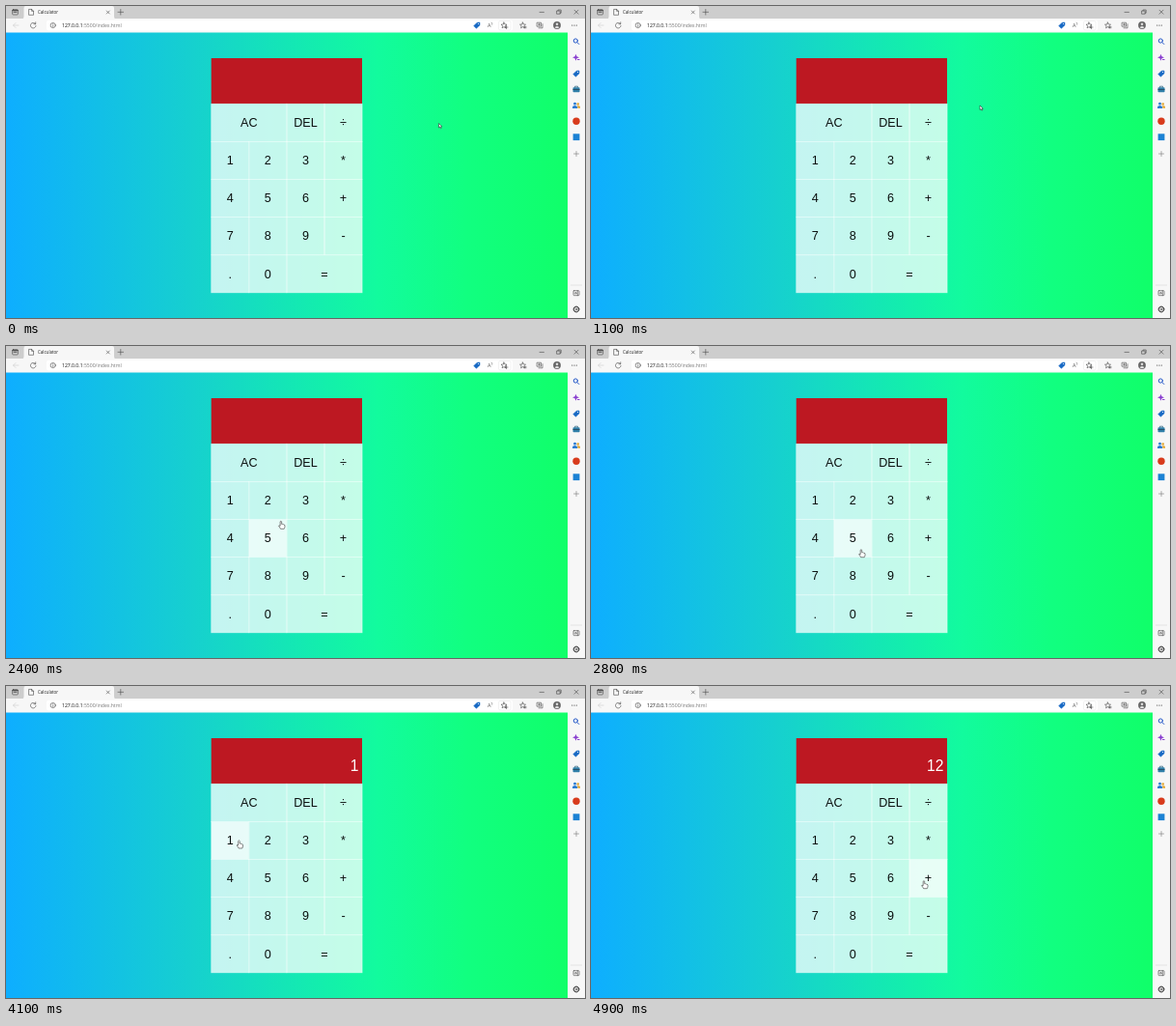
An HTML page that plays this animation: 600 px wide and 323 px high, repeating every 5000 ms.

```html
<!DOCTYPE html>
<html lang="en">
<head>
<meta charset="utf-8">
<title>Calculator</title>
<style>
  html, body { margin: 0; width: 100%; height: 100%; overflow: hidden; background: #f7f7f7; }
  svg { display: block; width: 600px; height: 323px; }
  .ui { font-family: "Open Sans", "Noto Sans", sans-serif; }
  .line { fill: none; stroke: #444; stroke-width: .6; stroke-linecap: round; stroke-linejoin: round; }
  .key rect { fill: rgba(255, 255, 255, .75); stroke: rgba(255, 255, 255, .5); stroke-width: .8; }
  .key.hover rect { fill: rgba(255, 255, 255, .9); }
  .key text { font: 12.6px "Liberation Sans", Arial, sans-serif; text-anchor: middle; fill: #0a0f0e; }
  #display { font: 15.6px "Liberation Sans", Arial, sans-serif; text-anchor: end; fill: #fff; }
  .pointer { fill: #fff; stroke: #333; stroke-width: .6; stroke-linejoin: round; }
</style>
</head>
<body>
<svg viewBox="0 0 600 323" xmlns="http://www.w3.org/2000/svg">
  <defs>
    <linearGradient id="sky">
      <stop offset="0" stop-color="#0eaeff"/>
      <stop offset=".33" stop-color="#16d0cf"/>
      <stop offset=".66" stop-color="#12fb9e"/>
      <stop offset=".82" stop-color="#11ff80"/>
      <stop offset="1" stop-color="#10ff69"/>
    </linearGradient>
    <g id="tag">
      <path d="M-3.2 .6 .2-2.8 2.9-3 3-.2-.6 3.2Z" fill="#1769c4" stroke="#1769c4" stroke-width=".6" stroke-linejoin="round"/>
      <circle cx="1.5" cy="-1.5" r=".6" fill="#fff"/>
    </g>
    <path id="star" d="M0-3 .9-1 3-.8 1.4.6 1.9 2.8 0 1.6-1.9 2.8-1.4.6-3-.8-.9-1Z"/>
  </defs>

  <!-- tab strip -->
  <rect width="600" height="14" fill="#cdcdcd"/>
  <path d="M16.500 13.500Q18.500 13 18.500 11V2Q18.500 0 20.500 0H110Q112 0 112 2V11Q112 13 114 13.500Z" fill="#f7f7f7"/>
  <g class="line">
    <rect x="6.600" y="3.600" width="5.800" height="5.400" rx="1"/>
    <path d="M6.800 4.600H12.200M8 6.200H11" stroke-width="1"/>
    <path d="M24 3.400H26.600L28.500 5.300V9.300H24ZM26.600 3.400V5.300H28.500"/>
    <path d="M104.300 5 107.300 8M107.300 5 104.300 8M116 6.300H121.600M118.800 3.500V9.100"/>
    <path d="M553 6.400H557.400M571 5H574.200V8.200H571ZM572 5V4H575.200V7.200H574.200M589 4.200 593 8.200M593 4.200 589 8.200"/>
  </g>
  <text class="ui" x="33" y="7.900" font-size="4.500" fill="#222">Calculator</text>

  <!-- toolbar -->
  <rect y="13" width="600" height="14.500" fill="#f7f7f7"/>
  <rect x="42" y="14.800" width="483" height="10.600" rx="2" fill="#fff"/>
  <path class="line" d="M13 20H7.500M10 17.500 7.500 20 10 22.500" style="stroke:#ccc"/>
  <g class="line">
    <path d="M30.500 18.500A2.800 2.800 0 1 0 31 20.500M30.700 16.800V18.700H28.800"/>
    <circle cx="48.700" cy="20" r="2.600"/>
    <path d="M48.700 19.800V21.400M48.700 18.600V18.700"/>
  </g>
  <text class="ui" x="58" y="22" font-size="5.100" fill="#777"><tspan fill="#111">127.0.0.1</tspan>:5500/index.html</text>
  <use href="#tag" x="488" y="20"/>
  <text class="ui" x="499" y="22" font-size="5.500" fill="#555">A</text>
  <path class="line" d="M503.300 17Q504.500 18 503.700 19.300" style="stroke:#777"/>
  <rect x="510.500" y="15.500" width="12.500" height="9.400" rx="1.500" fill="#fff" stroke="#ddd" stroke-width=".4"/>
  <g class="line">
    <use href="#star" x="516" y="20"/>
    <path d="M517 22H520M518.500 20.500V23.500"/>
    <use href="#star" x="535.500" y="20"/>
    <path d="M537 21.400H539M537 22.700H539"/>
    <path d="M550.500 17.200H554.500V21.200H550.500ZM552 22.800H556V18.700M552.500 18.200V20.200M551.500 19.200H553.500"/>
  </g>
  <circle cx="571" cy="20" r="3.900" fill="#666"/>
  <circle cx="571" cy="18.800" r="1.300" fill="#ddd"/>
  <path d="M568.500 22.300Q571 19.300 573.500 22.300Q571 24.400 568.500 22.300Z" fill="#ddd"/>
  <g fill="#333"><circle cx="586.700" cy="20" r=".6"/><circle cx="589" cy="20" r=".6"/><circle cx="591.300" cy="20" r=".6"/></g>

  <!-- sidebar -->
  <g class="line" style="stroke:#2458c8;stroke-width:1"><circle cx="590.300" cy="36" r="2.100"/><path d="M592 37.700 593.800 39.500"/></g>
  <path d="M590.500 49.800 591.500 52.300 594 53.300 591.500 54.300 590.500 56.800 589.500 54.300 587 53.300 589.500 52.300Z" fill="#8a3fd0"/>
  <path d="M592 55.500H594.500" stroke="#8a3fd0"/>
  <use href="#tag" x="591" y="70"/>
  <path d="M589.500 84.500V83.200H592.500V84.500" fill="none" stroke="#376a85" stroke-width=".8"/>
  <rect x="587.500" y="84.300" width="7" height="5" rx=".8" fill="#2f7fa8"/>
  <path d="M587.500 86.500H594.500" stroke="#27465a" stroke-width=".8"/>
  <g fill="#2b7cd3"><circle cx="589.500" cy="101.200" r="1.400"/><path d="M587 106V104.500Q587 103 589.500 103T592 104.500V106Z"/></g>
  <g fill="#e0a52f"><circle cx="592.700" cy="101.500" r="1.300"/><path d="M592.200 103.200Q595 103 595 104.500V105.700H592.200Z"/></g>
  <circle cx="591" cy="119.200" r="3.700" fill="#d83b1c"/>
  <rect x="587.600" y="132.300" width="6.800" height="6.800" fill="#1c82d4"/>
  <path class="line" d="M588.500 153H593.500M591 150.500V155.500" style="stroke:#777"/>
  <path d="M585 289H597" stroke="#d5d5d5" stroke-width=".6"/>
  <g class="line">
    <rect x="588" y="294.700" width="6" height="5" rx=".7"/>
    <path d="M592.300 294.700V299.700M589 297.200H591.200M590.300 296.200 591.300 297.200 590.300 298.200"/>
    <circle cx="591" cy="314" r="2.900" stroke-dasharray="1.500 .78" stroke-width="1"/>
    <circle cx="591" cy="314" r="2.500"/><circle cx="591" cy="314" r=".9"/>
  </g>

  <!-- page -->
  <rect y="27.500" width="582" height="295.500" fill="url(#sky)"/>
  <rect x="212.700" y="54" width="156.300" height="47.300" fill="#bd1822"/>
  <text id="display" x="365.400" y="88"></text>
  <g id="keys"></g>

  <g id="cursor">
    <path id="arrow" class="pointer" d="M0 0V4.500L1.100 3.600 1.900 5.200 2.600 4.900 1.900 3.300H3.300Z"/>
    <path id="hand" class="pointer" d="M-.8.700Q0-.6.700.700V3.300Q1.500 2.800 1.900 3.600 2.700 3.200 3 4 4 3.700 4 4.900V6.300Q3.700 7.300 3.300 8.200H-.4Q-1 6.800-2.400 5.200-2.400 4.200-.8 5.200Z"/>
  </g>
</svg>
<script>
  const $ = id => document.getElementById(id);
  const NS = "http://www.w3.org/2000/svg";
  const LOOP = 5000, STEP = 100;
  const LEFT = 212.7, TOP = 101.3, CELL = 39.1;
  const rows = ["AC AC DEL ÷", "1 2 3 *", "4 5 6 +", "7 8 9 -", ". 0 = ="];
  const keys = [];

  function add(parent, name, attrs) {
    const node = document.createElementNS(NS, name);
    for (const k in attrs) node.setAttribute(k, attrs[k]);
    return parent.appendChild(node);
  }

  rows.forEach((row, r) => {
    const labels = row.split(" ");
    labels.forEach((label, c) => {
      if (labels[c - 1] === label) return;
      const x = LEFT + c * CELL, y = TOP + r * CELL;
      const w = labels[c + 1] === label ? 2 * CELL : CELL;
      const node = add($("keys"), "g", { class: "key" });
      add(node, "rect", { x, y, width: w, height: CELL });
      add(node, "text", { x: x + w / 2, y: y + 23.8 }).textContent = label;
      keys.push({ node, x, y, w });
    });
  });

  // time, x, y of the pointer tip
  const path = [
    [0, 448.5, 121.5], [300, 448.5, 121.5], [1100, 403, 103], [1800, 294, 127],
    [2800, 280, 210.5], [3400, 237.500, 159.500], [3700, 240, 159.800], [4100, 241.500, 159.800],
    [4400, 272, 161], [4600, 273, 162], [4900, 345, 201.500], [5000, 345, 201.500]
  ];

  function pointAt(t) {
    const i = path.findIndex(p => p[0] > t);
    const [t0, x0, y0] = path[i - 1], [t1, x1, y1] = path[i];
    const u = (t - t0) / (t1 - t0), e = u * u * (3 - 2 * u);
    return [x0 + (x1 - x0) * e, y0 + (y1 - y0) * e];
  }

  function draw() {
    const t = Math.floor(performance.now() % LOOP / STEP) * STEP;
    const [x, y] = pointAt(t);
    let over = false;
    for (const k of keys) {
      const hit = x >= k.x && x < k.x + k.w && y >= k.y && y < k.y + CELL;
      k.node.classList.toggle("hover", hit);
      over = over || hit;
    }
    $("cursor").setAttribute("transform", `translate(${x} ${y})`);
    $("hand").style.display = over ? "" : "none";
    $("arrow").style.display = over ? "none" : "";
    $("display").textContent = t < 3800 ? "" : t < 4500 ? "1" : "12";
    requestAnimationFrame(draw);
  }
  draw();
</script>
</body>
</html>
```
